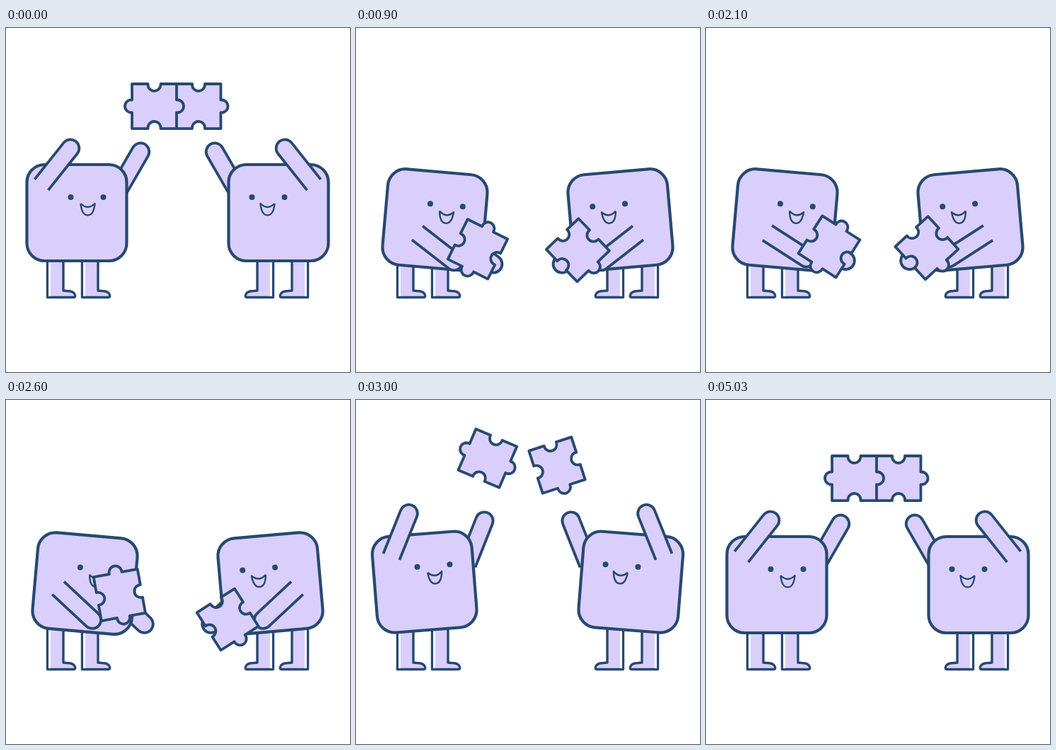
An HTML page with a canvas that plays this animation: 486 px wide and 486 px high, repeating every 5060 ms.

```html
<!DOCTYPE html>
<html lang="en">
<head>
<meta charset="utf-8">
<title>Puzzle friends</title>
<style>
html, body { margin: 0; width: 100%; height: 100%; overflow: hidden; background: #fff; }
canvas { display: block; }
</style>
</head>
<body>
<canvas id="stage" width="486" height="486"></canvas>
<script>
const ctx = document.getElementById('stage').getContext('2d');
const LOOP = 5060;
const LILAC = '#dacffb';
const NAVY = '#274970';
const { PI, sin, cos, min, max } = Math;

// Poses are [x, y, degrees].
const mix = (a, b, f) => a + (b - a) * f;
const blend = (a, b, f) => a.map((v, i) => mix(v, b[i], f));
const linear = (t, from, to) => min(1, max(0, (t - from) / (to - from)));
const ease = (t, from, to) => {
  const s = linear(t, from, to);
  return s * s * (3 - 2 * s);
};

// Swing of the held pieces: 0 low, 1 high.
const swing = t => (1 - cos((t - 300) / 383.3 * PI)) / 2;

function bodyPose(t) {
  const lean = ease(t, 2600, 2750);
  const settle = ease(t, 2900, 3150);
  return [
    mix(mix(111.5, 95, lean), 100, settle),
    mix(mix(271, 255, ease(t, 2480, 2660)), 261, settle),
    mix(mix(5, -7, lean), 0, settle)
  ];
}

// An arm hangs at the held shoulder, is flung up past its resting angle and swings back.
function armPose(t, held, rest, flungAngle) {
  const [x, y] = blend(held, rest, ease(t, 2480, 2780));
  const holding = mix(43, 30, swing(min(t, 2600)));
  const raised = mix(holding, flungAngle, ease(t, 2600, 2770));
  return [x, y, mix(raised, rest[2], ease(t, 2850, 3070))];
}

// A piece swings in the hands, rises along a bowed path and falls into place.
function piecePose(t, piece) {
  const rise = ease(t, ...piece.rise);
  const fall = linear(t, 2850, 3150) ** 2;
  const held = blend(piece.low, piece.high, swing(min(t, 2600)));
  const thrown = blend(held, piece.apex, rise)
    .map((v, i) => v + piece.bow[i] * sin(PI * rise));
  return blend(thrown, piece.rest, fall);
}

const leftPiece = {
  low: [170, 316, 110], high: [175, 307, 126], apex: [178, 73, 31], rest: [209.5, 110.5, 0],
  bow: [-22, 0, -34], rise: [2530, 2800], sides: [-1, 1, -1, 1]
};
const rightPiece = {
  low: [315, 317, 45], high: [311, 309, 48], apex: [288, 86, 96], rest: [272, 110.5, 0],
  bow: [0, 40, 45], rise: [2550, 2870], sides: [-1, 1, -1, -1]
};

function paint(width) {
  ctx.lineWidth = width;
  ctx.fillStyle = LILAC;
  ctx.strokeStyle = NAVY;
  ctx.fill();
  ctx.stroke();
}

function placed([x, y, degrees], draw) {
  ctx.save();
  ctx.translate(x, y);
  ctx.rotate(degrees * PI / 180);
  draw();
  ctx.restore();
}

function drawArm(pose) {
  placed(pose, () => {
    ctx.beginPath();
    ctx.moveTo(0, -12.3);
    ctx.arc(66, 0, 12.3, -PI / 2, PI / 2);
    ctx.lineTo(0, 12.3);
    paint(3.8);
  });
}

function drawLeg(x) {
  ctx.beginPath();
  ctx.moveTo(x, 300);
  ctx.lineTo(x, 380.5);
  ctx.lineTo(x + 37, 380.5);
  ctx.quadraticCurveTo(x + 41, 380, x + 38, 375);
  ctx.quadraticCurveTo(x + 35, 371.5, x + 28, 371.5);
  ctx.lineTo(x + 22.5, 371);
  ctx.lineTo(x + 22.5, 300);
  paint(3.4);
  ctx.fillStyle = '#fff';
  ctx.fillRect(x + 1.7, 300, 2.8, 79);
}

function drawFace() {
  ctx.fillStyle = NAVY;
  for (const x of [-8.5, 37.5]) {
    ctx.beginPath();
    ctx.arc(x, -22, 4, 0, 2 * PI);
    ctx.fill();
  }
  ctx.beginPath();
  ctx.moveTo(5.5, -13);
  ctx.quadraticCurveTo(15.5, -3, 25.5, -13);
  ctx.quadraticCurveTo(24, 3.5, 15.5, 3.5);
  ctx.quadraticCurveTo(7, 3.5, 5.5, -13);
  paint(2.4);
}

function drawFriend(t) {
  drawLeg(58.5);
  drawLeg(107.5);
  drawArm(armPose(t, [142, 293], [157, 232, -60], -95));
  placed(bodyPose(t), () => {
    ctx.beginPath();
    ctx.roundRect(-70.5, -68, 141, 136, 25);
    paint(4.2);
    drawFace();
  });
  drawArm(armPose(t, [86.5, 289.5], [50, 221.5, -51.5], -121));
}

// sides: top, right, bottom, left; 1 is a tab, -1 a notch
function drawPiece(t, piece) {
  const half = 31.5, radius = 9, neck = 0.12;
  placed(piecePose(t, piece), () => {
    ctx.beginPath();
    for (const side of piece.sides) {
      ctx.lineTo(-half, -half);
      ctx.arc(0, -half - side, radius, PI - side * neck, side * neck, side < 0);
      ctx.lineTo(half, -half);
      ctx.rotate(PI / 2);
    }
    ctx.closePath();
    paint(3.8);
  });
}

function render(t) {
  ctx.setTransform(1, 0, 0, 1, 0, 0);
  ctx.fillStyle = '#fff';
  ctx.fillRect(0, 0, 486, 486);
  ctx.lineJoin = 'round';
  drawFriend(t);
  ctx.setTransform(-1, 0, 0, 1, 485, 0);
  drawFriend(t);
  ctx.setTransform(1, 0, 0, 1, 0, 0);
  drawPiece(t, rightPiece);
  drawPiece(t, leftPiece);
}

// Twenty pictures a second, shown alternately for 30 and 70 ms.
// The first one still shows the joined pieces.
function stepTime(ms) {
  const t = Math.floor(ms / 100) * 100 + (ms % 100 >= 30 ? 50 : 0);
  return t || LOOP;
}

const start = performance.now();
function tick() {
  render(stepTime((performance.now() - start) % LOOP));
  requestAnimationFrame(tick);
}
tick();
</script>
</body>
</html>
```
